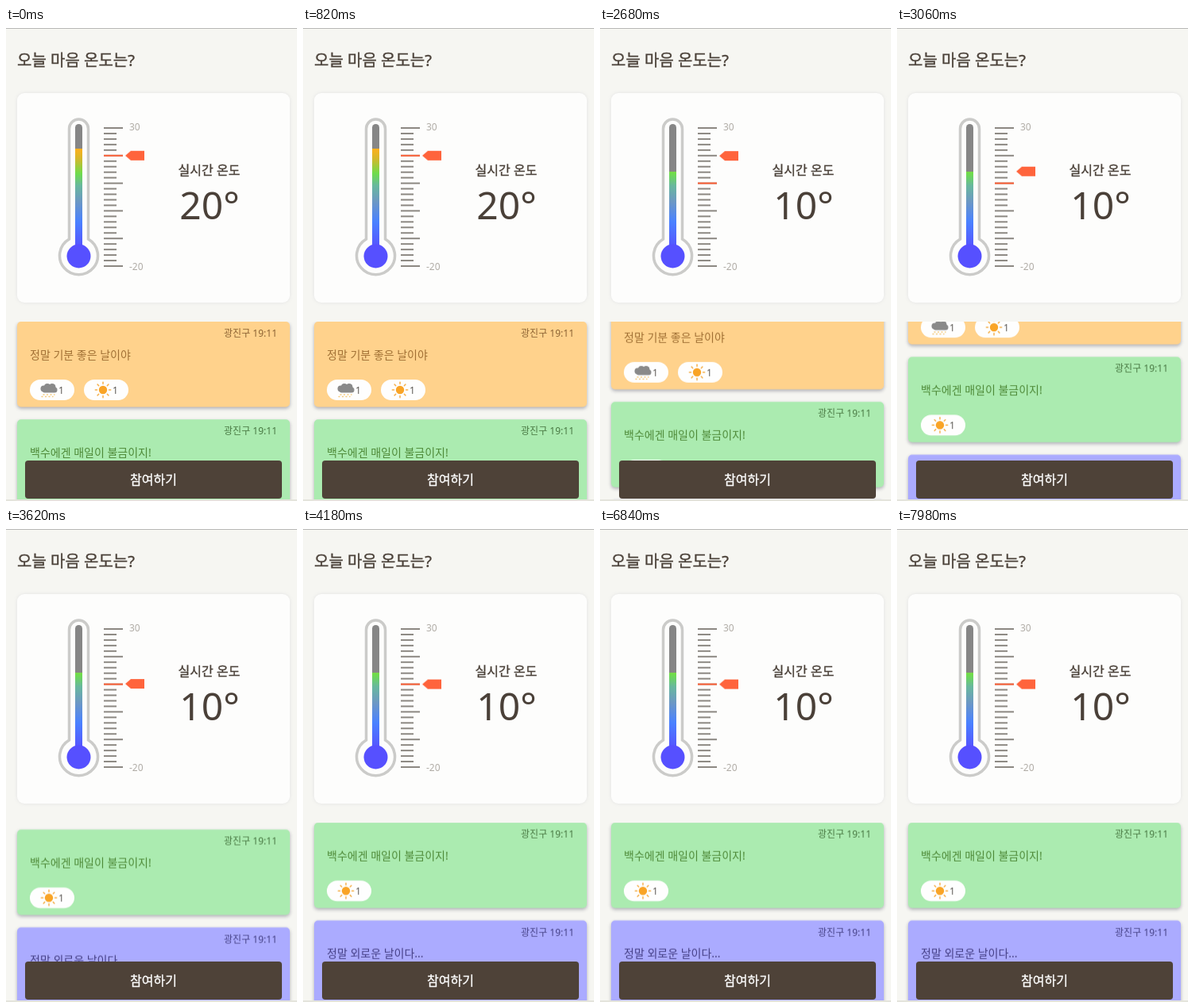
These frames come from a looping animation (366 px wide and 596 px high, 8000 ms). An HTML page:

```html
<!DOCTYPE html>
<html lang="ko">
<head>
<meta charset="utf-8">
<title>오늘 마음 온도는?</title>
<style>
  html, body { margin: 0; width: 100%; height: 100%; overflow: hidden; background: #f6f6f2; }
  svg { display: block; width: 366px; height: 596px; }
  text { font-family: "Noto Sans", "Noto Sans CJK KR", "Noto Sans CJK", sans-serif; }
  .dark { fill: #4a4038; stroke: #4a4038; stroke-width: .35px; font-weight: 500; }
  .card { filter: drop-shadow(0 2px 2px rgba(75, 75, 95, .42)); }
  .panel { filter: drop-shadow(0 0 2px rgba(120, 120, 150, .15)); }
  .scale { fill: #b0aca6; font-size: 12px; font-weight: 300; }
  .degrees { fill: #4a4038; font-size: 48px; font-weight: 300; }
</style>
</head>
<body>
<svg viewBox="0 0 366 596">
  <defs>
    <linearGradient id="heat" gradientUnits="userSpaceOnUse" x1="0" y1="152" x2="0" y2="278">
      <stop offset="0" stop-color="#ffb01c"/>
      <stop offset=".1" stop-color="#d4b82c"/>
      <stop offset=".25" stop-color="#6edc4c"/>
      <stop offset=".37" stop-color="#68b89e"/>
      <stop offset=".53" stop-color="#6c98c4"/>
      <stop offset=".73" stop-color="#4a82ff"/>
      <stop offset="1" stop-color="#5650ff"/>
    </linearGradient>
    <clipPath id="window"><rect x="6" y="370" width="360" height="224"/></clipPath>
    <g id="sun">
      <circle r="5.2" fill="#f9a426"/>
      <g id="rays" stroke="#f5b04c" stroke-width="1.5" stroke-linecap="round"></g>
    </g>
    <g id="cloud">
      <g fill="#8a8a8a">
        <circle cx="-6.500" cy="-1.500" r="4"/><circle cx="-2" cy="-4" r="4"/>
        <circle cx="4" cy="-3.500" r="4.500"/><circle cx="7" cy="0" r="3.500"/>
        <rect x="-8" y="-2" width="15.500" height="5.500" rx="2.500"/>
      </g>
      <path stroke="#f5cc80" stroke-width="1.500" stroke-linecap="round" stroke-dasharray="1 3.500" d="M-7 6H7M-9 8.500H5"/>
    </g>
  </defs>

  <rect width="366" height="596" fill="#f6f6f2"/>
  <rect width="366" height="1" fill="#b8b8b6"/>
  <text class="dark" x="14" y="47.500" font-size="20">오늘 마음 온도는?</text>

  <rect class="panel" x="14" y="82" width="343" height="264" rx="9" fill="#fdfdfc"/>
  <path d="M79.500 266V127a12 12 0 0 1 24 0V266A24 24 0 1 1 79.500 266Z"
        fill="#fdfdfc" stroke="#cbcbc9" stroke-width="3.500"/>
  <rect x="87" y="121" width="9" height="160" rx="4.500" fill="#868686"/>
  <g id="ticks" stroke="#8c8882" stroke-width="2"></g>
  <g id="readings"></g>
  <circle cx="91.500" cy="287.500" r="15" fill="#5650ff"/>
  <path id="pointer" d="M150 0L157-6H174V6H157Z" fill="#ff643c"/>
  <text class="scale" x="155" y="129">30</text>
  <text class="scale" x="155" y="305">-20</text>
  <text class="dark" x="255.500" y="184.500" font-size="16" text-anchor="middle">실시간 온도</text>

  <g clip-path="url(#window)"><g id="list"></g></g>

  <rect x="24" y="545" width="323" height="48" rx="4" fill="#4e4238"/>
  <text x="185.500" y="574.500" font-size="16" font-weight="500" text-anchor="middle"
        fill="#fff" stroke="#fff" stroke-width=".3">참여하기</text>
  <rect y="594" width="366" height="2" fill="#e4e4dc"/>
</svg>
<script>
const LOOP = 8000, CHANGE = 2600;
const POINTER_TIME = 1210, SCROLL_TIME = 1560, PITCH = 123.3;
const $ = id => document.getElementById(id);
const tickY = degrees => 126 + (30 - degrees) * 3.48;

$('rays').innerHTML = Array.from({ length: 8 }, (_, i) =>
  `<path d="M7.500 0H9.700" transform="rotate(${i * 45})"/>`).join('');

$('ticks').innerHTML = Array.from({ length: 26 }, (_, i) =>
  `<path d="M123 ${tickY(30 - 2 * i)}H${i % 5 ? 139 : 147}"/>`).join('');

const reading = (id, degrees, fillTop) => `
  <g id="${id}">
    <rect x="87" y="${fillTop}" width="9" height="${281 - fillTop}" fill="url(#heat)"/>
    <path d="M123 ${tickY(degrees)}H147" stroke="#ff643c" stroke-width="2"/>
    <text class="degrees" x="256" y="241" text-anchor="middle">${degrees}°</text>
  </g>`;
$('readings').innerHTML = reading('warm', 20, 152) + reading('cool', 10, 181);

const cards = [
  { text: '정말 기분 좋은 날이야', fill: '#ffd28c', ink: '#a07034', meta: '#8c6434', icons: ['cloud', 'sun'] },
  { text: '백수에겐 매일이 불금이지!', fill: '#abebb0', ink: '#4e8a38', meta: '#4a7a44', icons: ['sun'] },
  { text: '정말 외로운 날이다...', fill: '#ababff', ink: '#443e84', meta: '#464286', icons: [] }
];

const chip = (icon, i) => `
  <g transform="translate(${30 + 68 * i} 73)">
    <rect width="56" height="26" rx="13" fill="#fefefe"/>
    <use href="#${icon}" x="24" y="13"/>
    <text x="36" y="17.500" font-size="12" fill="#5c5854">1</text>
  </g>`;

$('list').innerHTML = cards.map((c, i) => `
  <g transform="translate(0 ${370 + PITCH * i})">
    <rect class="card" x="14" width="343" height="107.500" rx="5" fill="${c.fill}"/>
    <text x="341" y="19" font-size="12" text-anchor="end" fill="${c.meta}">광진구 19:11</text>
    <text x="30" y="46.500" font-size="14" fill="${c.ink}">${c.text}</text>
    ${c.icons.map(chip).join('')}
  </g>`).join('');

// Holds one value until CHANGE, then eases to the next and stays there.
function play(id, property, from, to, duration, easing) {
  $(id).animate([
    { [property]: from, offset: 0 },
    { [property]: from, offset: CHANGE / LOOP, easing },
    { [property]: to, offset: (CHANGE + duration) / LOOP },
    { [property]: to, offset: 1 }
  ], { duration: LOOP, iterations: Infinity });
}

const shift = y => `translateY(${y}px)`;
play('warm', 'opacity', 1, 0, 1, 'step-start');
play('cool', 'opacity', 0, 1, 1, 'step-start');
play('pointer', 'transform', shift(tickY(20)), shift(tickY(10)), POINTER_TIME, 'cubic-bezier(.4, 0, .2, 1)');
play('list', 'transform', shift(0), shift(-PITCH), SCROLL_TIME, 'cubic-bezier(0, 0, .2, 1)');
</script>
</body>
</html>
```
